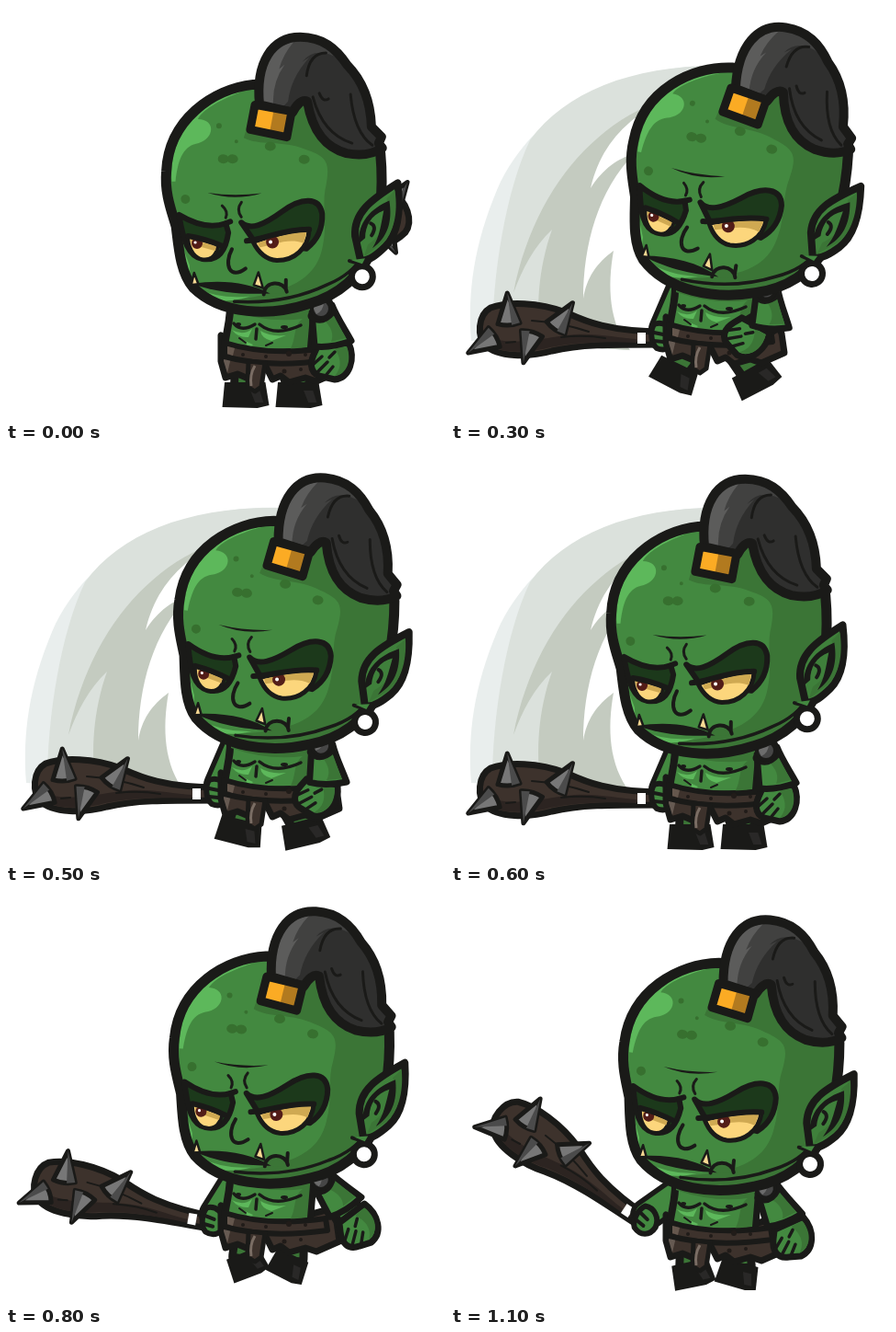
An HTML page that plays this animation: 478 by 450 pixels, repeating every 1.2 s.

```html
<!DOCTYPE html>
<html lang="en">
<head>
<meta charset="utf-8">
<title>Walking orc</title>
<style>
  html, body { margin: 0; width: 100%; height: 100%; overflow: hidden; background: #fff; }
  svg { display: block; width: 478px; height: 450px; }
  .ink { stroke: #1a1a18; stroke-linejoin: round; stroke-linecap: round; }
  .line { fill: none; stroke: #1a1a18; stroke-linecap: round; stroke-linejoin: round; }
  .black { fill: #1a1a18; }
  .skin { fill: #438940; }
  .shade { fill: #3b7536; }
  .light { fill: #5db85b; }
  .brow { fill: #1c391b; }
  .eye { fill: #fcd67c; }
  .lid { fill: #cfa952; }
  .hide { fill: #3d322c; }
  .tooth { fill: #f8d993; }
</style>
</head>
<body>
<svg viewBox="0 0 478 450" xmlns="http://www.w3.org/2000/svg">
  <defs>
    <path id="skull" d="M268 86C224 91 176 125 174 181C172 205 180 224 185 241C188 264 190 291 204 307C235 337 288 338 330 324C365 314 386 291 396 270C407 245 411 200 407 160C400 110 340 82 268 86Z"/>
    <clipPath id="inSkull"><use href="#skull"/></clipPath>
    <path id="pony" d="M275 108C270 62 288 34 319 34C343 34 358 46 370 64C388 82 396 106 397 131L408 142L405 149L409 154C400 160 386 163 370 160C348 154 333 138 327 104C321 101 315 108 311 116Z"/>
    <clipPath id="inPony"><use href="#pony"/></clipPath>
    <g id="spike">
      <path class="ink" stroke-width="5" fill="#777" d="M0 -33L-12 0Q0 4 12 0Z"/>
      <path fill="#4b4b4b" d="M0 -33L3 2L12 0Z"/>
    </g>
    <g id="boot">
      <path class="black" d="M-.5 0L-.45 -27H.42L.5 -2L.25 1Z"/>
      <path fill="#292827" d="M.1 -18H.3L.38 -5H.2Z"/>
    </g>
  </defs>

  <g id="trail">
    <path fill="#e9eeed" d="M300 65C200 62 95 100 50 200C25 260 18 310 22 364L195 374L200 200L300 100Z"/>
    <path fill="#dbe1dc" d="M300 65C200 63 125 92 86 146C60 200 45 290 45 365L195 374L200 200L300 100Z"/>
    <path fill="#c4cbc0" d="M300 90C190 90 95 175 68 312C78 285 90 262 110 243C95 285 92 330 98 368L195 374L200 200L300 100Z"/>
    <path fill="#fff" d="M195 374C172 345 170 305 177 266C158 280 148 295 144 318C144 260 160 200 200 160C182 166 166 176 152 198C160 165 175 142 200 122L260 150L250 374Z"/>
  </g>

  <g id="club">
    <path class="ink hide" stroke-width="7" d="M232 374C170 374 145 362 125 353C95 342 62 341 43 348C29 356 28 380 38 389C50 402 85 402 110 395C140 388 170 388 232 388Z"/>
    <path fill="#2c2421" d="M36 379C65 390 95 382 125 378C155 374 180 381 202 382V386C160 384 135 386 108 391C85 398 52 398 41 387Z"/>
    <path class="line" stroke-width="2" d="M88 362Q120 364 150 374M120 380Q145 377 168 381M60 386L70 385"/>
    <path fill="#fff" d="M203 375H212V387H203Z"/>
    <use href="#spike" transform="translate(47 380) rotate(-121)"/>
    <use href="#spike" transform="translate(63 365) rotate(-3)"/>
    <use href="#spike" transform="translate(88 376) rotate(196)"/>
    <use href="#spike" transform="translate(114 370) rotate(34)"/>
  </g>

  <g id="farArm">
    <path id="farInk" class="line" stroke-width="36"/>
    <path id="farSkin" fill="none" stroke="#438940" stroke-width="25" stroke-linecap="round"/>
    <g id="fist">
      <path class="ink skin" stroke-width="6" d="M221 366C230 362 241 368 243 379C243 391 234 396 224 392C217 386 217 372 221 366Z"/>
      <path class="line" stroke-width="4" d="M221 375L231 377M221 384L231 385"/>
    </g>
  </g>

  <g id="legs"></g>

  <g id="torso">
    <path class="ink hide" stroke-width="7" d="M234 358L234 386L239 404L252 400L264 405L268 381Z"/>
    <path class="ink hide" stroke-width="7" d="M278 382L290 406L299 402L308 409L326 404L338 408L363 397L360 376L352 362Z"/>
    <path fill="#665a52" d="M238 372L246 378L241 399L237 386Z"/>
    <path class="ink skin" stroke-width="8" d="M244 312C246 338 240 352 238 370Q280 381 331 374L336 312Z"/>
    <path class="shade" d="M245 322Q290 340 332 324L328 371L309 374C317 360 312 348 323 340Q285 345 245 331Z"/>
    <path class="light" d="M246 352Q258 359 268 351L264 360Q253 361 246 352ZM277 353Q288 360 305 358L289 364Q278 361 277 353ZM258 363L269 368L265 372Z"/>
    <path class="line" stroke-width="3.5" d="M248 345Q256 355 271 346M276 346Q293 360 321 347M273 351L272 362"/>
    <path class="line" stroke-width="2" d="M254 361L261 366M290 366L283 369"/>
    <ellipse class="black" cx="253" cy="346" rx="3" ry="2"/><ellipse class="black" cx="303" cy="349" rx="4" ry="2"/>
    <path class="ink hide" stroke-width="6" d="M238 366Q285 381 348 372L350 385Q285 394 238 381Z"/>
    <path fill="#65574d" d="M241 370L249 372L247 380L241 378Z"/>
    <g fill="#211c19"><circle cx="258" cy="379" r="2"/><circle cx="283" cy="381" r="2"/><circle cx="308" cy="378" r="3"/><circle cx="326" cy="379" r="2"/><circle cx="303" cy="397" r="2.5"/><circle cx="321" cy="395" r="2"/></g>
    <path class="ink hide" stroke-width="5" d="M264 386L282 388L278 414L271 419L263 414Z"/>
    <path fill="none" stroke="#7a6d64" stroke-width="3" d="M271 391Q265 401 267 413"/>
  </g>

  <path id="foreInk" class="line" stroke-width="33"/>
  <path id="foreSkin" fill="none" stroke="#438940" stroke-width="21" stroke-linecap="round"/>
  <g id="hand">
    <path class="ink skin" stroke-width="7" d="M339 368L373 364C381 382 374 402 358 404L345 401C332 399 330 388 335 377Z"/>
    <path class="shade" d="M358 370L371 368C377 384 371 398 358 400C367 390 364 380 358 370Z"/>
    <path class="line" stroke-width="3.5" d="M334 388L344 379M339 396L350 385M347 401L356 390M352 380L358 374"/>
  </g>
  <g id="sleeve">
    <path class="ink skin" stroke-width="7" d="M333 333L355 325C360 338 369 351 376 364Q354 372 336 370Z"/>
    <path class="shade" d="M345 340L355 333L370 361L354 365Q359 353 345 340Z"/>
    <path class="line" stroke-width="9" d="M333 337Q344 345 355 332L351 321"/>
    <circle class="ink" cx="343" cy="329" r="10" stroke-width="4" fill="#464646"/>
    <path fill="#6c6c6c" d="M335 329Q337 320 346 321Q346 331 338 335Z"/>
  </g>

  <g id="head">
    <use href="#skull" class="skin"/>
    <g clip-path="url(#inSkull)">
      <path class="shade" d="M258 144C275 153 300 146 325 156C350 164 352 171 348 195C343 215 350 235 345 260C340 290 320 313 235 322L300 345L440 300L430 80L280 70Z"/>
      <path class="light" d="M180 192C177 140 210 100 255 94C229 104 212 115 208 124C227 124 227 144 209 150C193 153 187 165 184 192ZM190 257C194 281 196 293 201 297L200 283ZM207 308Q235 320 266 316Q229 329 207 308Z"/>
      <g fill="#37702f"><circle cx="231" cy="131" r="3"/><ellipse cx="236" cy="167" rx="6" ry="5"/><ellipse cx="246" cy="167" rx="6" ry="5"/><circle cx="195" cy="211" r="5"/><ellipse cx="287" cy="153" rx="6" ry="5"/><ellipse cx="324" cy="167" rx="6" ry="5"/><circle cx="250" cy="148" r="2"/></g>
    </g>
    <use href="#skull" class="line" stroke-width="11"/>
    <path class="black" d="M219 204Q248 208 278 204Q248 213 219 204Z"/>
    <path class="line" stroke-width="3" d="M235 218Q242 224 239 231M256 214Q250 222 256 230"/>

    <path class="ink brow" stroke-width="6" d="M188 228C205 238 223 243 239 237L242 247C239 269 229 278 214 276C199 274 193 257 188 228Z"/>
    <path class="ink eye" stroke-width="4" d="M198 251L231 260C229 275 221 278 212 276C203 273 198 262 198 251Z"/>
    <path class="lid" d="M201 254L229 262L228 267L202 260Z"/>
    <ellipse cx="208" cy="259" rx="6" ry="6" fill="#531d18"/><circle cx="206" cy="258" r="1.6" fill="#fff"/>
    <path class="line" stroke-width="6" d="M198 251Q217 254 234 261M239 237L244 235"/>

    <path class="ink brow" stroke-width="6" d="M256 236C266 245 281 238 300 224C321 208 341 207 344 226C345 246 336 257 327 264L270 256Z"/>
    <path class="ink eye" stroke-width="5" d="M269 257C290 250 315 243 330 243C329 264 314 277 295 277C281 276 274 267 269 257Z"/>
    <path class="lid" d="M274 258C292 252 311 246 327 246L324 258C307 252 292 260 276 263Z"/>
    <ellipse cx="290" cy="257" rx="7" ry="7" fill="#531d18"/><circle cx="288" cy="257" r="2" fill="#fff"/>
    <path class="line" stroke-width="6" d="M262 256C281 254 302 243 330 243"/>

    <path class="line" stroke-width="4" d="M246 265C237 282 244 299 261 286"/>
    <path class="shade" d="M281 314C281 298 304 298 306 312Z"/>
    <path class="line" stroke-width="4" d="M281 314C281 299 303 298 306 311M305 298L305 308"/>
    <path class="ink tooth" stroke-width="2.5" d="M202 304L205 291L210 304ZM270 304L275 290L280 307Z"/>
    <path class="black" d="M203 303C235 298 264 301 288 313C262 314 235 314 203 303Z"/>
    <path class="line" stroke-width="3.5" d="M249 322Q305 325 350 303Q378 291 389 270"/>

    <path class="ink" fill="#3f803b" stroke-width="8" d="M380 250C378 225 396 211 426 192C430 224 426 248 413 261C405 269 395 278 386 276Z"/>
    <path class="shade" d="M423 200C427 225 422 247 409 258L390 272L394 259C414 245 419 225 414 209Z"/>
    <path class="black" d="M384 258C383 234 397 220 417 211C421 235 415 251 399 263C407 250 408 238 411 222C397 227 391 239 391 252Z"/>
    <path class="line" stroke-width="4" d="M397 236Q404 239 398 249M374 277L394 282"/>
    <circle class="ink" cx="388" cy="294" r="11.5" stroke-width="7" fill="#fff"/>
    <path class="skin" d="M376 276L391 274L388 280Z"/>

    <use href="#pony" fill="#2f2f2e"/>
    <g clip-path="url(#inPony)">
      <path fill="#414140" d="M270 110L270 40L325 30Q350 35 361 57Q335 43 321 61L329 56Q309 78 306 104L296 115Z"/>
      <path fill="#5c5c5b" d="M278 108C273 76 284 46 312 39Q300 53 296 69L302 64Q288 84 290 109Z"/>
      <path class="line" stroke-width="3" d="M326 76Q329 51 347 51M340 95Q344 105 350 101M374 96Q378 137 398 151M333 99Q344 139 376 149"/>
    </g>
    <use href="#pony" class="line" stroke-width="10"/>
    <path fill="#fbab24" d="M270 108L310 115L305 143L265 135Z"/>
    <path fill="#b27a1f" d="M291 111L310 115L305 143L286 139Z"/>
    <path class="line" stroke-width="9" d="M270 108L310 115L305 143L265 135Z"/>
  </g>
</svg>
<script>
const $ = id => document.getElementById(id);
const STEP = 100, LOOP = 1200, TAU = 2 * Math.PI, RAD = Math.PI / 180;
const clamp = v => Math.max(0, Math.min(1, v));

const place = (id, x, y, turn, px, py) =>
  $(id).setAttribute('transform', `translate(${x - px} ${y - py}) rotate(${turn} ${px} ${py})`);
const show = (id, on) => { $(id).style.display = on ? '' : 'none'; };
const limb = (name, d) => ['Ink', 'Skin'].forEach(part => $(name + part).setAttribute('d', d));

// Grip x, y and turn: wound up behind the head, then held low, then raised.
function clubPose(t, lift) {
  if (t < 150) {
    const u = t / 100;
    return [271 + 18 * u, 284 - 12 * u, 156 + 4 * u];
  }
  const raise = clamp((t - 600) / 500) ** 1.3;
  return [208 - 15 * raise, 380 + lift - 27 * raise, 33.5 * raise];
}

function leg(x, y, turn, width, hipX, hipY) {
  const a = turn * RAD, ax = x + 23 * Math.sin(a), ay = y - 25 * Math.cos(a);
  return `<path class="line" stroke-width="34" d="M${hipX} ${hipY}L${ax} ${ay + 2}"/>
    <path d="M${hipX} ${hipY}L${ax} ${ay}" stroke="#3b7536" stroke-width="16"/>
    <use href="#boot" transform="translate(${x} ${y}) rotate(${turn}) scale(${width} 1)"/>`;
}

function draw(t) {
  const bounce = TAU * t / 600;              // two bounces per loop
  const stride = Math.sin(TAU * t / LOOP);   // one arm and leg swing per loop
  const bend = stride * stride;
  const lift = -10 + 10 * Math.cos(bounce);
  const sway = Math.cos(bounce - 220 * RAD);

  place('head', 389.5 + 3.5 * sway, 291.5 + 5.5 * Math.cos(bounce + 72 * RAD), 4.6 + 5.5 * sway, 387, 293);
  place('torso', 0, lift, 0, 0, 0);

  const sleeveTurn = 20 * stride - 8 * bend, a = sleeveTurn * RAD;
  const elbowX = 345 + 8 * Math.cos(a) - 30 * Math.sin(a);
  const elbowY = 330 + lift + 8 * Math.sin(a) + 30 * Math.cos(a);
  const handX = 355 - 35 * stride, handY = 387 + lift - 5 * bend;
  place('sleeve', 345, 330 + lift, sleeveTurn, 345, 330);
  place('hand', handX, handY, 35 * stride, 355, 385);
  limb('fore', `M${elbowX} ${elbowY}L${handX} ${handY - 5}`);

  const width = 51 + 10 * Math.min(stride, 0), sole = 436 + 1.1 * lift;
  $('legs').innerHTML =
    leg(261 - 15 * stride - 8 * bend, sole, 26 * stride, width, 262, 394 + lift) +
    leg(319 + 20 * stride, sole + 3 * bend, -29 * stride, width, 312, 394 + lift);

  const hidden = t > 150 && t < 250;
  const [x, y, turn] = clubPose(t, lift);
  show('club', !hidden);
  place('club', x, y, turn, 208, 380);

  const grip = (turn + 3) * RAD;
  show('farArm', t > 250);
  place('fist', x, y, turn, 208, 380);
  limb('far', `M250 ${332 + lift}L${x + 25 * Math.cos(grip)} ${y + 25 * Math.sin(grip) - 10}`);

  $('trail').setAttribute('opacity', clamp(Math.min(t - 150, 750 - t) / 150));
}

let shown = -1;
function tick() {
  const t = Math.floor(performance.now() % LOOP / STEP) * STEP;
  if (t !== shown) draw(shown = t);
  requestAnimationFrame(tick);
}
tick();
</script>
</body>
</html>
```
